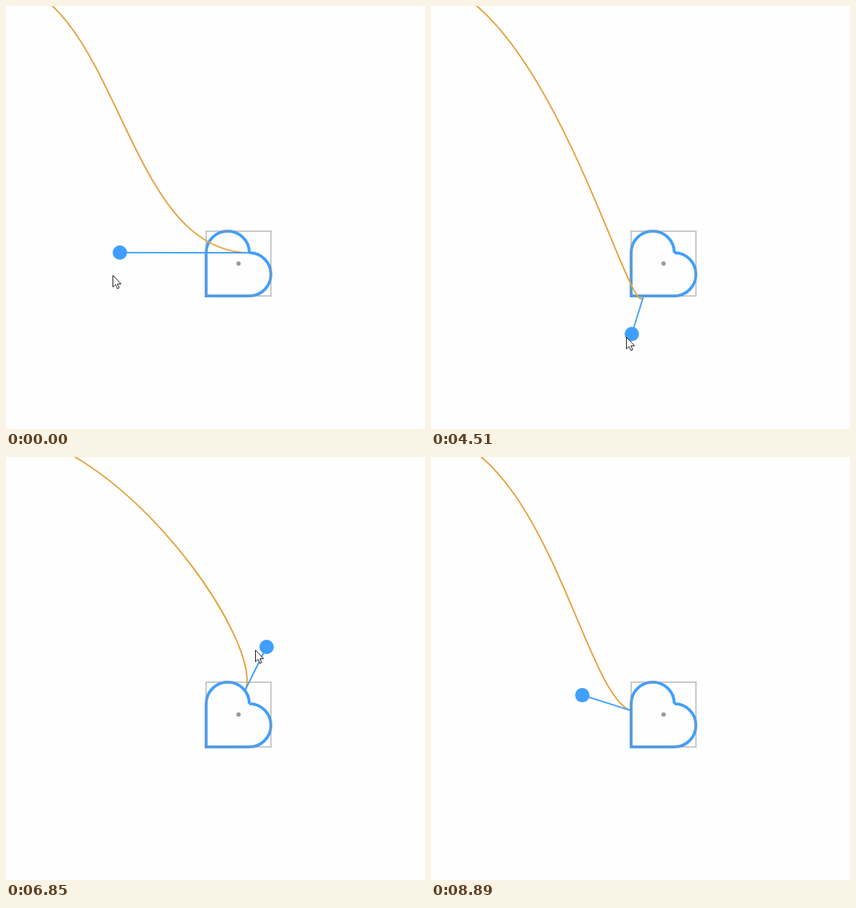
An HTML page that plays this animation: 582x588 px, repeating every 9.61 s.

```html
<!DOCTYPE html>
<html lang="en">
<head>
<meta charset="utf-8">
<title>Curve handle</title>
<style>
html, body { margin: 0; width: 100%; height: 100%; overflow: hidden; background: #fefefe; }
svg { display: block; width: 582px; height: 588px; }
</style>
</head>
<body>
<svg viewBox="0 0 582 588" fill="none">
  <path d="M338 343A30 30 0 0 1 338 403H278V343A30 30 0 0 1 338 343" stroke="#409eff" stroke-width="4"/>
  <rect x="278" y="313" width="90" height="90" stroke="#909399" stroke-opacity=".5" stroke-width="2"/>
  <circle cx="323" cy="358" r="3" fill="#999"/>
  <path id="curve" stroke="#e6a23c" stroke-width="2"/>
  <path id="arm" stroke="#409eff" stroke-width="2"/>
  <circle id="knob" r="10" fill="#409eff"/>
  <path id="cursor" d="M.5.5V16.7L4.2 13.2L6.7 18.8L9.2 17.8L6.8 12.3H11.8Z" fill="#fff" stroke="#14141e"/>
</svg>
<script>
const LOOP = 9610, TICK = 10, GRAB = 2820, GONE = 8890, LEAD = 18;
const START = [-22, -37], OUT = [158, -37], REST = [338, 343];
const PIVOT = [330, 370];
const $ = id => document.getElementById(id);
const clamp = v => Math.min(1, Math.max(0, v));

// The knob swings around PIVOT: time, angle in degrees, radius.
const swing = [
  [2820, -171, 174], [3470, -155, 59.5], [3780, 30, 67], [4050, 50, 135],
  [4510, 120.7, 100], [5580, 325.5, 139.5], [6180, 465, 132], [6700, 651, 118],
  [6790, 651, 118], [6850, 646.8, 110.7], [7300, 460, 130], [7910, 350.6, 153],
  [8720, 198, 126]
];

// Free pointer moves: start, end, x, y.
const strolls = [
  [30, 380, 179, 440], [380, 740, 165, 341], [1140, 1690, 170, 324],
  [1840, 1960, 160, 342], [2140, 2280, 122, 345], [2500, 2630, 155, 350]
];

function slope(i, k) {
  const p = swing[i - 1], c = swing[i], n = swing[i + 1];
  if (!p || !n || p[1] === c[1] || c[1] === n[1]) return 0;
  return (n[k] - p[k]) / (n[0] - p[0]);
}

function knobAt(t) {
  let i = 0;
  while (i < swing.length - 2 && t >= swing[i + 1][0]) i++;
  const a = swing[i], b = swing[i + 1], d = b[0] - a[0];
  const s = clamp((t - a[0]) / d), e = s * s * (3 - 2 * s);
  const [deg, r] = [1, 2].map(k => a[k] + (b[k] - a[k]) * e
    + d * s * (1 - s) * ((1 - s) * slope(i, k) - s * slope(i + 1, k)));
  const phi = deg * Math.PI / 180;
  return [PIVOT[0] + r * Math.cos(phi), PIVOT[1] + r * Math.sin(phi)];
}

function pointerAt(t) {
  if (t >= GRAB) {
    const [x, y] = knobAt(t + LEAD);
    return [x - 3, y + 7];
  }
  let x = 148, y = 374;
  for (const [from, to, tx, ty] of strolls) {
    const s = clamp((t - from) / (to - from)), e = s * s * (3 - 2 * s);
    x += (tx - x) * e;
    y += (ty - y) * e;
  }
  return [x, y];
}

// The height the arm points at drifts down and back during the drag.
const aimAt = t => 362 + 11 * Math.sin(Math.PI * clamp((t - 4510) / 4210));

// Where the ray from an inner point towards the knob leaves the heart.
function outline([x, y], aimY) {
  const ax = 308, len = Math.hypot(x - ax, y - aimY) || 1;
  const dx = (x - ax) / len, dy = (y - aimY) / len;
  const wall = Math.min(30 / Math.abs(dx), (dy > 0 ? 403 - aimY : aimY - 343) / Math.abs(dy));
  const round = (cx, cy) => {
    const ox = ax - cx, oy = aimY - cy, b = ox * dx + oy * dy;
    const q = b * b - ox * ox - oy * oy + 900;
    return q < 0 ? 0 : -b + Math.sqrt(q);
  };
  const r = Math.max(wall, round(308, 343), round(338, 373));
  return [ax + dx * r, aimY + dy * r];
}

function render(t) {
  const knob = knobAt(t);
  const end = t < GRAB ? REST : outline(knob, aimAt(t));
  $('curve').setAttribute('d', `M${START}C${OUT} ${knob} ${end}`);
  $('arm').setAttribute('d', `M${knob}L${end}`);
  $('knob').setAttribute('cx', knob[0]);
  $('knob').setAttribute('cy', knob[1]);
  $('cursor').setAttribute('transform', `translate(${pointerAt(t).map(Math.round)})`);
  $('cursor').setAttribute('visibility', t < GONE ? 'visible' : 'hidden');
}

const begin = performance.now();
function tick() {
  const t = (performance.now() - begin) % LOOP;
  render(Math.floor(t / TICK) * TICK);
  requestAnimationFrame(tick);
}
tick();
</script>
</body>
</html>
```
